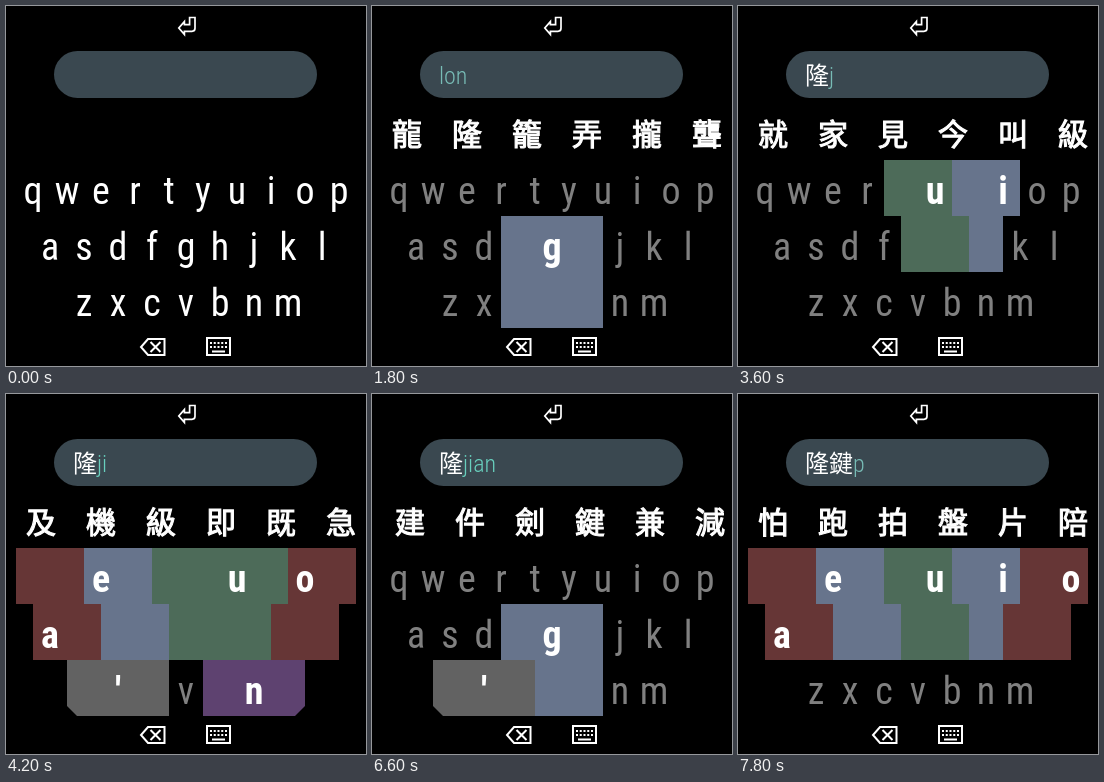
An HTML page for the animation above (8000 ms loop, 360 by 360 pixels).

```html
<!DOCTYPE html>
<html lang="zh">
<head>
<meta charset="utf-8">
<style>
  html, body { margin: 0; height: 100%; overflow: hidden; background: #000; }
  svg { display: block; width: 100%; height: 100%; }
  text { font-family: "Roboto Condensed", Roboto, "Noto Sans CJK SC", "Noto Sans CJK", sans-serif; font-stretch: 75%; fill: #fff; }
  #keys text { font-size: 38px; text-anchor: middle; }
  #keys .dim { fill: #808080; }
  #keys .bold { font-weight: 700; }
  #words text { font: 30px "Noto Sans CJK SC", "Noto Sans CJK", sans-serif; text-anchor: middle; stroke: #fff; stroke-width: 1.1; }
  #entry { font-size: 24px; }
  #entry tspan { font-weight: 300; }
  .icon { fill: none; stroke: #fff; stroke-width: 2; }
</style>
</head>
<body>
<svg viewBox="0 0 360 360">
  <clipPath id="strip"><rect x="5" y="100" width="350" height="50"/></clipPath>
  <rect x="48" y="45" width="263" height="47" rx="23.5" fill="#3a4850"/>
  <text id="entry" x="67" y="77.5"></text>
  <g clip-path="url(#strip)"><g id="words"></g></g>
  <g id="keys"></g>
  <g class="icon">
    <path stroke-width="1.7" d="M189 11.5H183.6V18.7H178.4V15.6L172.8 22L178.4 28.4V25.3H186Q189 25.3 189 22.3Z"/>
    <path d="M142 333H158.5V349H142L135 341ZM144.5 336L154.5 346M154.5 336L144.5 346"/>
    <path d="M201 332H224V349H201ZM206 345.5H219"/>
    <path stroke-dasharray="2 1.75" d="M204 337H221M204 341H221"/>
  </g>
</svg>
<script>
const STEP = 600, LOOP = 8000;
const RED = '#663636', BLUE = '#67748c', GREEN = '#4d6b59', GRAY = '#626262', PURPLE = '#5e4270';
const ROWS = [['qwertyuiop', 27], ['asdfghjkl', 44], ['zxcvbnm', 78]];
const baseline = row => 198 + 56 * row;

// Merged keys: colour, outline, label, label x, label row.
// Capitals are the layouts used when "i" is not offered.
const AREAS = {
  a: [RED, 'M10 154H78V210H95V266H27V210H10Z', 'a', 44, 1],
  e: [BLUE, 'M78 154H146V210H163V266H95V210H78Z', 'e', 95, 0],
  u: [GREEN, 'M146 154H214V210H231V266H163V210H146Z', 'u', 197, 0],
  U: [GREEN, 'M146 154H282V210H265V266H163V210H146Z', 'u', 231, 0],
  i: [BLUE, 'M214 154H282V210H265V266H231V210H214Z', 'i', 265, 0],
  o: [RED, 'M282 154H350V210H333V266H265V210H282Z', 'o', 333, 0],
  O: [RED, 'M282 154H350V210H333V266H265V210H282Z', 'o', 299, 0],
  g: [BLUE, 'M129 210H231V322H129Z', 'g', 180, 1],
  v: [PURPLE, 'M129 266H231V322H129Z', 'v', 180, 2],
  n: [PURPLE, 'M197 266H299V312L289 322H197Z', 'n', 248, 2],
  "'": [GRAY, 'M61 266H163V322H71L61 312Z', "'", 112, 2],
};

// Committed text, pinyin, candidates, offered keys, candidate scroll.
const LONG = '龍隆籠弄攏聾', JIAN = '見間建件劍鍵兼減';
const STATES = [
  ['', '', '', ''],
  ['', 'l', '來了裡老兩路', 'aeuiov'],
  ['', 'lo', LONG, 'Un'],
  ['', 'lon', LONG, 'g'],
  ['', 'long', LONG, ''],
  ['隆', '', '', ''],
  ['隆', 'j', '就家見今叫級', 'ui'],
  ['隆', 'ji', '及機級即既急', "aeUO'n"],
  ['隆', 'jia', '家加假價架佳', "O'n"],
  ['隆', 'jian', JIAN, "g'"],
  ['隆', 'jian', JIAN, "g'", 40],
  ['隆', 'jian', JIAN, "g'", 117],
  ['隆鍵', '', '', ''],
  ['隆鍵', 'p', '怕跑拍盤片陪', 'aeuio'],
];
const COMPLETE = ['long', 'ji', 'jia', 'jian'];

const label = (s, x, y, cls = '') => `<text class="${cls}" x="${x}" y="${y}">${s}</text>`;
const put = (id, html) => document.getElementById(id).innerHTML = html;

function drawKeys(offered) {
  const letters = ROWS.flatMap(([row, x], r) =>
    [...row].map((c, i) => label(c, x + 34 * i, baseline(r), offered && 'dim')));
  const areas = [...offered].map(key => {
    const [fill, d, c, x, row] = AREAS[key];
    return `<path fill="${fill}" d="${d}"/>` + label(c, x, baseline(row), 'bold');
  });
  put('keys', letters.concat(areas).join(''));
}

function draw([text, pinyin, words, offered, scroll = 0]) {
  const tint = COMPLETE.includes(pinyin) ? '#68cfbd' : '#78bcb6';
  put('entry', `${text}<tspan fill="${tint}">${pinyin}</tspan>`);
  put('words', [...words].map((w, i) => label(w, 35 + 60 * i - scroll, 139)).join(''));
  drawKeys(offered);
}

let shown = -1;
function tick() {
  const now = Math.floor(performance.now() % LOOP / STEP);
  if (now !== shown) draw(STATES[shown = now]);
  requestAnimationFrame(tick);
}
tick();
</script>
</body>
</html>
```
